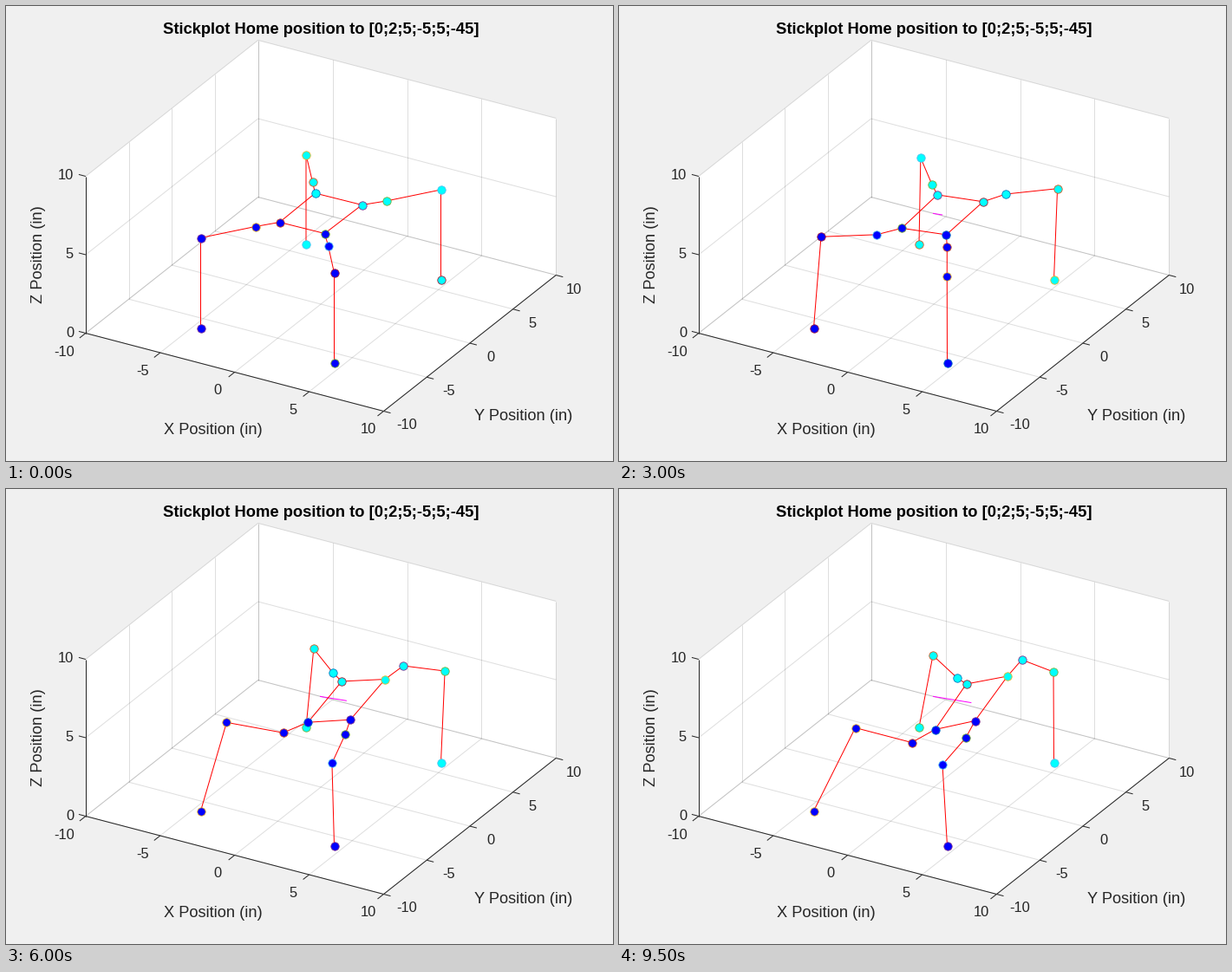
Recreate the animation shown at these times as a matplotlib script. Size 700x525 px, loop 10 s.

```python
import numpy as np
import matplotlib.pyplot as plt
from matplotlib.animation import FuncAnimation

W, H, DPI = 700, 525, 100
FRAMES, INTERVAL = 20, 500
PX = 72 / DPI
INK = "#262626"
EDGES = ["#0072bd", "#d95319", "#edb120", "#7e2f8e",
         "#77ac30", "#4dbeee", "#a2142f"]

plt.rcParams["font.family"] = "Liberation Sans"
fig = plt.figure(figsize=(W / DPI, H / DPI), dpi=DPI, facecolor="#f0f0f0")
ax = fig.add_axes([0, 0, 1, 1])
ax.set_xlim(-0.5, W - 0.5)
ax.set_ylim(H - 0.5, -0.5)
ax.axis("off")


def project(x, y, z):
    return np.array([362.6 + 17.18 * x + 9.94 * y,
                     343.5 + 4.5 * x - 7.85 * y - 18.1 * z])


def segment(p, q, color, zorder, alpha=1):
    ax.plot(*zip(p, q), color=color, lw=PX, alpha=alpha, zorder=zorder,
            solid_capstyle="butt")


def label(x, y, s, size=16.5, **kw):
    kw = {"ha": "center", "va": "baseline", "color": INK, **kw}
    ax.text(x, y, s, fontsize=size * PX, **kw)


def draw_axes():
    outline = [(-10, -10, 0), (-10, -10, 10), (-10, 10, 10),
               (10, 10, 10), (10, 10, 0), (10, -10, 0)]
    ax.fill(*zip(*(project(*c) for c in outline)), color="white", lw=0, zorder=0)

    def grid(a, b):
        segment(project(*a), project(*b), INK, 1, 0.15)

    for v in range(-10, 11, 5):
        grid((v, -10, 0), (v, 10, 0))
        grid((v, 10, 0), (v, 10, 10))
        grid((-10, v, 0), (10, v, 0))
        grid((-10, v, 0), (-10, v, 10))
    for z in (0, 5, 10):
        grid((-10, -10, z), (-10, 10, z))
        grid((-10, 10, z), (10, 10, z))

    corner = project(10, -10, 0)
    segment(project(-10, -10, 0), corner, INK, 2)
    segment(corner, project(10, 10, 0), INK, 2)
    segment(project(-10, -10, 0), project(-10, -10, 10), INK, 2)

    for k, v in enumerate(range(-10, 11, 5)):
        p, q = project(v, -10, 0), project(10, v, 0)
        segment(p, p + (-7, 5.5), INK, 2)
        segment(q, q + (8, 2.1), INK, 2)
        label(66.5 + 86.6 * k + (4 if v > -10 else 0), 403 + 22.4 * k, str(v))
        label(462 + 48 * k, 488 - 39.2 * k, str(v))
    for z in (0, 5, 10):
        p = project(-10, -10, z)
        segment(p, p + (-8, -2.1), INK, 2)
        label(77.5, 381 - 18.15 * z, str(z), ha="right")

    label(238, 493, "X Position (in)", 18.3)
    label(596, 477, "Y Position (in)", 18.3)
    label(46, 286, "Z Position (in)", 18.3, rotation=90, ha="right",
          va="center", rotation_mode="default")
    label(362.5, 31, "Stickplot Home position to [0;2;5;-5;5;-45]", 18.35,
          color="black", weight="bold")


# Hip, shoulder and knee of each leg at start, halfway and end of the path.
LEGS = np.array([
    [[(315, 249), (340, 264.5), (364, 277)],
     [(287, 254), (311, 275), (337, 292)],
     [(224, 267), (246, 267), (272, 275)]],
    [[(367, 262), (390, 265), (410, 267)],
     [(371, 276), (386.5, 280.5), (399.5, 286.5)],
     [(378, 307.5), (376.5, 314.5), (372.5, 317.5)]],
    [[(410, 229), (431, 221), (447.5, 215.5)],
     [(438, 224.5), (454, 207.5), (464, 196.5)],
     [(501, 211.5), (506.5, 209.5), (500.5, 210.5)]],
    [[(356, 215.5), (380, 220), (400, 224.5)],
     [(353, 202.5), (371, 209.5), (389.5, 217.5)],
     [(345.5, 171), (351.5, 180.5), (361.5, 191.5)]],
])
FEET = np.array([(224, 371), (378, 411), (501, 315.5), (345.5, 274.5)])
EDGE_START = [(1, 2, 3, 3), (4, 5, 6, 4), (3, 4, 5, 6), (0, 1, 2, 5)]
MID = 0.54


def pose(i):
    """Joints of the four legs, shape (leg, joint, xy)."""
    t = i / (FRAMES - 1)
    s = t * t * (3 - 2 * t)
    weights = np.array([(s - MID) * (s - 1) / MID,
                        s * (s - 1) / (MID * (MID - 1)),
                        s * (s - MID) / (1 - MID)])
    joints = np.einsum("ljkc,k->ljc", LEGS, weights)
    return np.concatenate([joints, FEET[:, None]], axis=1)


draw_axes()
home = pose(0)[:, 0].mean(axis=0)
trace, = ax.plot([], [], color="magenta", lw=PX, zorder=3)
body, = ax.plot([], [], color="red", lw=PX, zorder=4)
limbs = [ax.plot([], [], color="red", lw=PX, zorder=4)[0] for _ in LEGS]
markers = [[ax.plot([], [], "o", ms=9.4 * PX, mew=0.8 * PX, zorder=6 - leg // 2,
                    mfc="blue" if leg < 2 else "cyan")[0] for _ in range(4)]
           for leg in range(4)]


def update(i):
    joints = pose(i)
    hips = joints[:, 0]
    trace.set_data(*zip(home, hips.mean(axis=0)))
    body.set_data(*np.vstack([hips, hips[:1]]).T)
    for leg, chain in enumerate(joints):
        limbs[leg].set_data(*chain.T)
        for dot, (x, y), c in zip(markers[leg], chain, EDGE_START[leg]):
            dot.set_data([x], [y])
            dot.set_markeredgecolor(EDGES[(c + 4 * i) % 7])
    return [trace, body, *limbs, *sum(markers, [])]


anim = FuncAnimation(fig, update, frames=FRAMES, interval=INTERVAL,
                     repeat=True, repeat_delay=0, blit=False)
plt.show()
```
